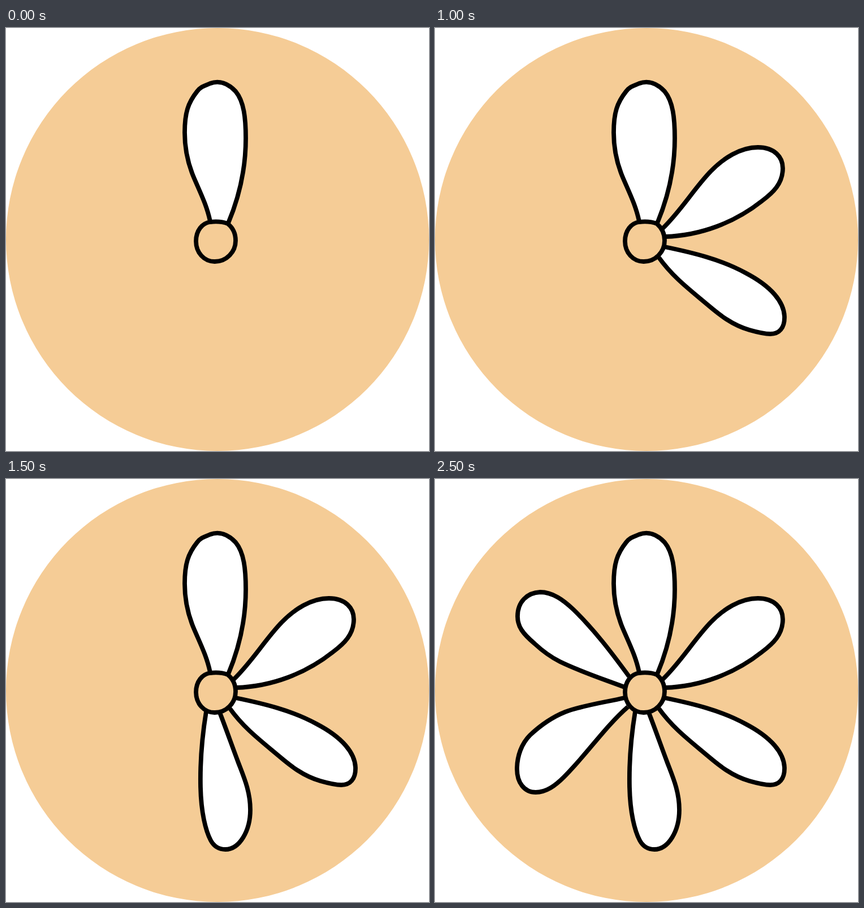
An HTML page that plays this animation: 748x748 px, repeating every 3 s.

```html
<!DOCTYPE html>
<html lang="en">
<head>
<meta charset="utf-8">
<title>Flower</title>
<style>
  html, body { margin: 0; height: 100%; overflow: hidden; background: #fff; }
  svg { display: block; width: 100%; height: 100%; }
  path { stroke: #000; stroke-width: 7.8; stroke-linejoin: round; }
  #petals { fill: #fff; }
  .tan { fill: #f5cc96; }
</style>
</head>
<body>
<svg viewBox="0 0 748 748">
  <circle class="tan" cx="374" cy="374" r="374"/>
  <g id="petals">
    <path d="M361 342C355 313 343 290 332 264C321 238 316 212 316 185C316 150 322 132 338 112C345 103 352 102 361 98C377 92 393 98 406 112C421 130 424 160 424 195C424 245 414 295 393 345"/>
    <path d="M402 355C436 322 458 284 487 254C510 230 540 211 571 211C600 211 615 228 615 248C615 275 598 291 578 306C530 344 470 367 407 369"/>
    <path d="M406 387C455 397 505 409 549 433C595 457 618 485 618 512C618 530 609 541 593 541C585 541 570 538 556 534C525 525 503 507 484 491C452 464 421 441 396 406"/>
    <path d="M354 411C346 460 343 500 344 545C345 590 353 622 362 639C368 650 377 655 388 655C413 655 432 622 432 585C432 553 421 528 411 502C400 473 390 444 378 413"/>
    <path d="M335 387C300 395 262 400 230 412C205 422 185 437 168 453C153 468 145 490 145 513C145 537 158 554 178 554C197 554 213 542 228 527C268 487 301 438 341 403"/>
    <path d="M335 368C295 353 258 341 221 323C203 314 190 304 176 291C155 273 146 261 146 243C146 217 163 201 186 200C208 200 227 214 245 231C282 267 313 308 343 349"/>
  </g>
  <path class="tan" d="M361 343C370 342 382 342 392 346C401 353 406 364 406 376C406 396 390 413 369 413C350 413 336 397 336 377C336 358 347 345 361 343Z"/>
</svg>
<script>
  const STEP = 500;
  const petals = [...document.querySelectorAll('#petals path')];

  // One more petal appears with every step, then the loop starts over.
  function draw() {
    const last = Math.floor(performance.now() / STEP) % petals.length;
    petals.forEach((petal, i) => petal.setAttribute('visibility', i <= last ? 'visible' : 'hidden'));
    requestAnimationFrame(draw);
  }
  draw();
</script>
</body>
</html>
```
